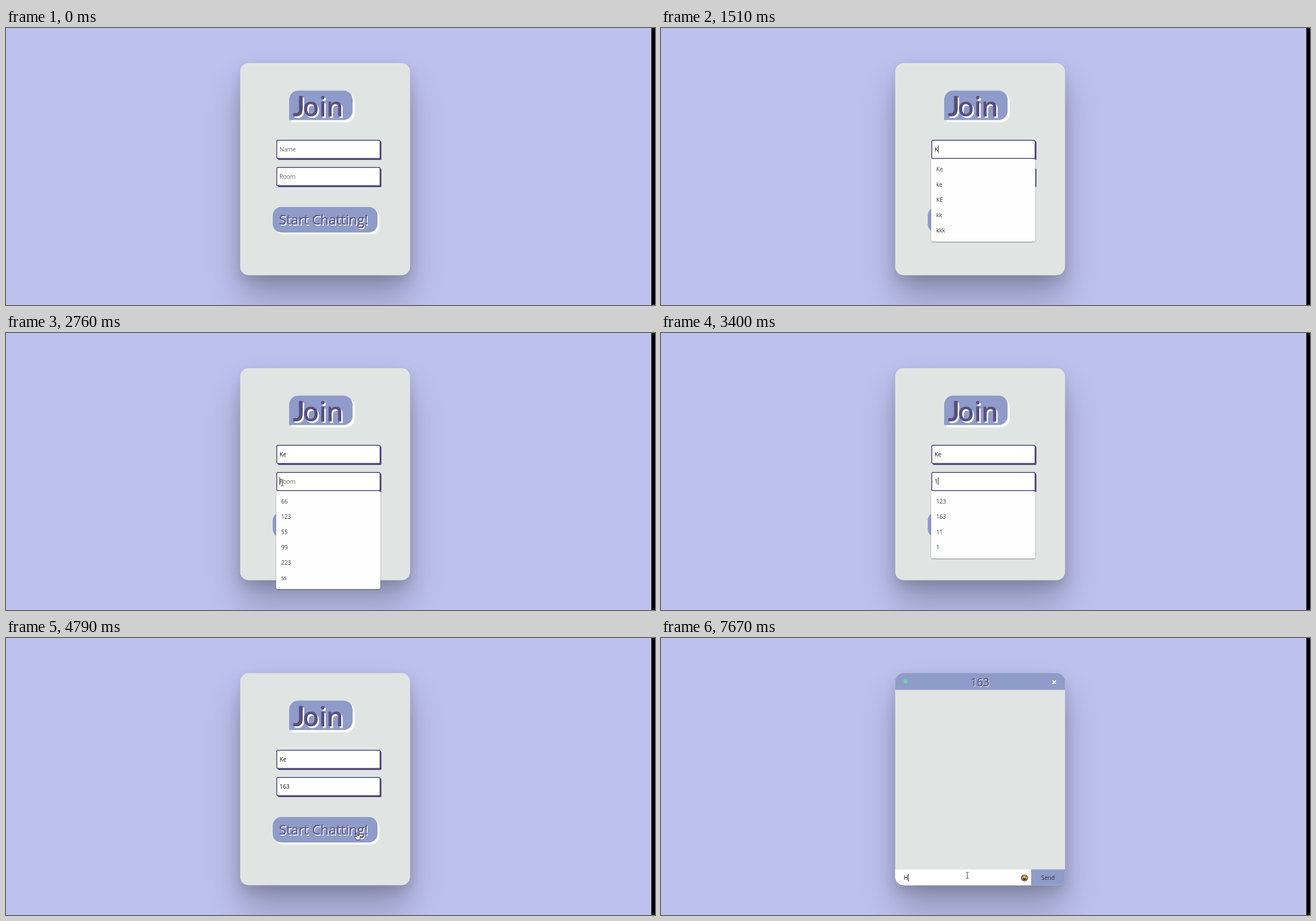
An HTML page that plays this animation: 1146x489 px, repeating every 8 s.

```html
<!DOCTYPE html>
<html lang="en">
<head>
<meta charset="utf-8">
<title>Chat room sign-in</title>
<style>
html, body { margin: 0; width: 100%; height: 100%; overflow: hidden; background: #bdc1ee; }
svg { display: block; width: 1146px; height: 489px; font-family: "Open Sans", "Noto Sans", sans-serif; font-size: 10.3px; }
.blue { fill: #8f9bc9; }
.ink { fill: #574f7e; }
.hint { fill: #686366; }
.value { fill: #151522; }
.item { fill: #3b3b3f; font-size: 10px; }
.join { font-size: 47px; font-weight: 600; }
.join .cap { font-family: Lato, sans-serif; font-size: 49px; font-weight: 700; }
.start { font-size: 23.6px; }
.room { font-size: 19.4px; }
.pointer { fill: #fff; stroke: #26262c; stroke-width: .9; stroke-linejoin: round; }
</style>
</head>
<body>
<svg viewBox="0 0 1146 489">
  <defs>
    <filter id="wide" x="-60%" y="-60%" width="220%" height="220%"><feGaussianBlur stdDeviation="29"/></filter>
    <filter id="near" x="-30%" y="-30%" width="160%" height="160%"><feGaussianBlur stdDeviation="10"/></filter>
    <filter id="soft" x="-10%" y="-10%" width="120%" height="120%"><feGaussianBlur stdDeviation="1.3"/></filter>
    <clipPath id="cardClip"><rect x="413.5" y="62" width="300" height="374.5" rx="15"/></clipPath>
  </defs>
  <rect width="1146" height="489" fill="#bdc1ee"/>
  <rect x="413.5" y="100" width="300" height="374.5" rx="15" opacity=".25" filter="url(#wide)"/>
  <rect x="413.5" y="70" width="300" height="374.5" rx="15" opacity=".12" filter="url(#near)"/>
  <rect x="1139.5" width="6.5" height="489"/>
  <rect x="413.5" y="62" width="300" height="374.5" rx="15" fill="#e0e5e3"/>

  <g id="join">
    <path id="badge" transform="translate(4 4)" fill="#fff" d="M500 162.500V126.500a16 16 0 0 1 16-16H596a16 16 0 0 1 16 16V146.500a16 16 0 0 1-16 16Z"/>
    <use href="#badge" x="-4" y="-4" style="display:none"/>
    <path class="blue" d="M500 162.500V126.500a16 16 0 0 1 16-16H596a16 16 0 0 1 16 16V146.500a16 16 0 0 1-16 16Z"/>
    <g id="joinText"></g>
    <g id="fields"></g>
    <rect x="474.500" y="319.500" width="185" height="45" rx="15" fill="#fff"/>
    <rect class="blue" x="471" y="316" width="185" height="45" rx="15"/>
    <g class="start">
      <text x="483.500" y="348.500" fill="#fff">Start Chatting!</text>
      <text x="482" y="347" class="ink">Start Chatting!</text>
    </g>
    <g id="list">
      <rect id="listShade" x="477" width="184" rx="4" opacity=".4" filter="url(#soft)"/>
      <rect id="listBox" x="477" width="184" rx="3" fill="#fefefe"/>
      <g id="items"></g>
    </g>
  </g>

  <g id="chat">
    <g clip-path="url(#cardClip)">
      <rect class="blue" x="413" y="62" width="301" height="29.500"/>
      <rect x="413" y="408.500" width="241" height="29" fill="#fff"/>
      <rect class="blue" x="653.500" y="408.500" width="61" height="29"/>
    </g>
    <circle cx="432" cy="76.500" r="4" fill="#67d1a8"/>
    <g class="room" text-anchor="middle">
      <text x="564.300" y="86" fill="#fff">163</text>
      <text x="563.300" y="85" fill="#4a4168">163</text>
    </g>
    <path d="M691.300 75l6 6m0-6l-6 6" stroke="#fff" stroke-width="1.900"/>
    <circle cx="641.800" cy="423.500" r="5.500" fill="#e9b64e" stroke="#2c2431" stroke-width="1.200"/>
    <path d="M639.800 420.800v1.800m4-1.800v1.800" stroke="#2c2431" stroke-width="1.200"/>
    <path d="M638.600 424.300h6.400a3.200 3.200 0 0 1-6.400 0Z" fill="#2c2431"/>
    <text x="683.300" y="427" text-anchor="middle" fill="#382f3c">Send</text>
    <text id="message" x="428.500" y="427"></text>
  </g>

  <rect id="caret" width="1" fill="#222"/>
  <path id="arrow" class="pointer" d="M0 0V10.200L2.400 8.100L4 11.700L5.600 11L4.100 7.500H7Z"/>
  <path id="beam" fill="none" stroke="#3c3c40" d="M-2.500-5.200H-.7L0-4.600L.7-5.200H2.500M0-4.600V4.800M-2.500 5.300H-.7L0 4.800L.7 5.300H2.500"/>
  <path id="hand" class="pointer" d="M-1 .8Q0-.6 1 .8V5L5 5.800Q6.300 6.200 6.200 7.600L5.300 11V13H-1V11.300L-4.200 7.600Q-4.400 6-3 6.300L-1 8Z"/>
</svg>
<script>
const LOOP = 8000, BLINK = 540, CHAT_AT = 4800;
const $ = id => document.getElementById(id);
const set = (el, attrs) => { for (const k in attrs) el.setAttribute(k, attrs[k]); };
const show = (el, on) => { el.style.display = on ? "" : "none"; };

$("joinText").innerHTML = [["#fff", 2.500], ["#574f7e", 0]].map(([fill, d]) =>
  `<text class="join" fill="${fill}" y="${156 + d}"><tspan class="cap" x="${506.5 + d}">J</tspan><tspan x="${524 + d}">oin</tspan></text>`).join("");

$("fields").innerHTML = [198, 246].map((y, i) =>
  `<rect class="ink" x="480" y="${y + 2}" width="183" height="33" rx="2"/>
   <rect x="478.200" y="${y + .2}" width="182.300" height="32" rx="1.500" fill="#fff" stroke="#4d4574" stroke-width="1.500"/>
   <text id="field${i}" x="483" y="${y + 20}"></text>`).join("");

// Text boxes: what is typed, and when the box has focus
const boxes = [
  { el: $("field0"), hint: "Name", focus: 590, blur: 2440, caretY: 207, keys: [[1510, "K"], [1680, "Ke"]] },
  { el: $("field1"), hint: "Room", focus: 2755, blur: CHAT_AT, caretY: 255, keys: [[3400, "1"], [3540, "16"], [3800, "163"]] },
  { el: $("message"), hint: "Type a message...", focus: 6280, blur: LOOP, caretY: 416.500, keys: [[7670, "H"]] }
];

// Suggestion lists: start time, top edge, entries
const lists = [
  [0, 231, ""],
  [590, 231, "Ke Ty ke TyMorven fernpool silvan4817"],
  [1510, 231, "Ke ke KE kk kkk"],
  [1680, 231, "Ke ke KE"],
  [2440, 231, ""],
  [2755, 279, "66 123 55 99 223 ss"],
  [3400, 279, "123 163 11 1"],
  [3540, 279, "163"],
  [3800, 279, ""]
];

// Pointer moves: start, time per step, hide time, points as [step, x, y]
const moves = [
  { at: 70, step: 75, hide: 1510, pts: [[0, 993, 452], [7, 570, 226]] },
  { at: 2060, step: 77.500, hide: 2980, pts: [[0, 560, 222], [3, 399, 153], [4, 409, 162.500], [7, 488, 264.500]] },
  { at: 4090, step: 79, hide: 5490, pts: [[0, 526.500, 286.500], [6, 619.500, 343.500]] },
  { at: 5490, step: 76, hide: 5970, pts: [[0, 604, 358], [3, 541, 418]] },
  { at: 5970, step: 80, hide: LOOP, pts: [[0, 541, 419]] }
];

const last = (rows, t) => rows.filter(r => r[0] <= t).pop();
const inside = (x, y, l, t, r, b) => x >= l && x <= r && y >= t && y <= b;

function pointerAt(t) {
  const m = moves.find(m => t >= m.at && t < m.hide);
  if (!m) return null;
  const k = Math.floor((t - m.at) / m.step);
  const i = m.pts.findIndex(p => p[0] > k);
  if (i < 0) return m.pts[m.pts.length - 1].slice(1);
  const [a, x, y] = m.pts[i - 1], [b, x2, y2] = m.pts[i];
  const u = (k - a) / (b - a), e = u * u * (3 - 2 * u);
  return [x + (x2 - x) * e, y + (y2 - y) * e];
}

function shapeAt(x, y, t) {
  if (t >= CHAT_AT) return inside(x, y, 413, 408, 632, 437) ? "beam" : "arrow";
  if (inside(x, y, 478, 198, 661, 231) || inside(x, y, 478, 246, 661, 279)) return "beam";
  return inside(x, y, 471, 284, 660, 364) ? "hand" : "arrow";
}

function drawBoxes(t) {
  show($("caret"), false);
  for (const b of boxes) {
    const key = last(b.keys, t);
    b.el.textContent = key ? key[1] : b.hint;
    b.el.setAttribute("class", key ? "value" : "hint");
    if (t < b.focus || t >= b.blur) continue;
    const since = t - (key ? key[0] : b.focus);
    const x = +b.el.getAttribute("x") + (key ? b.el.getComputedTextLength() : 0);
    set($("caret"), { x, y: b.caretY, height: 13.500 });
    show($("caret"), Math.floor(since / BLINK) % 2 === 0);
  }
}

let shown = "";
function drawList(t) {
  const [, top, words] = last(lists, t);
  show($("list"), words);
  if (words === shown) return;
  shown = words;
  const rows = words ? words.split(" ") : [];
  const height = rows.length * 27 + 11;
  $("items").innerHTML = rows.map((w, i) =>
    `<text class="item" x="486" y="${top + 22 + i * 27}">${w}</text>`).join("");
  set($("listShade"), { y: top + 1, height });
  set($("listBox"), { y: top, height });
}

function drawPointer(t) {
  const p = pointerAt(t);
  const shape = p && shapeAt(...p, t);
  for (const id of ["arrow", "beam", "hand"]) show($(id), id === shape);
  if (p) $(shape).setAttribute("transform", `translate(${p[0]} ${p[1]})`);
}

function draw(t) {
  show($("join"), t < CHAT_AT);
  show($("chat"), t >= CHAT_AT);
  drawBoxes(t);
  drawList(t);
  drawPointer(t);
}

const begin = performance.now();
function tick() {
  draw((performance.now() - begin) % LOOP);
  requestAnimationFrame(tick);
}
tick();
</script>
</body>
</html>
```
